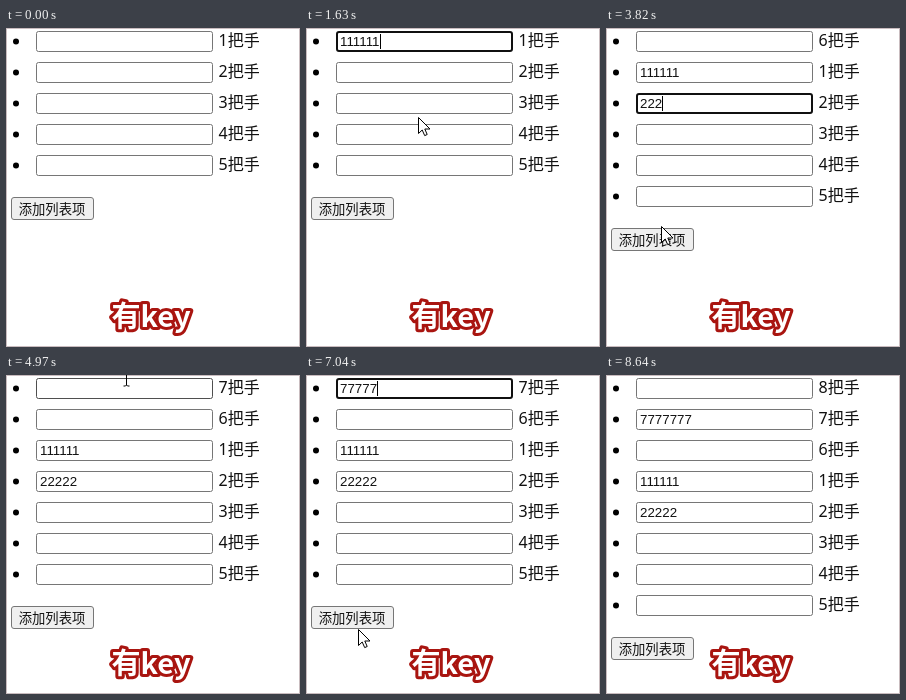
Write an HTML page that moves like this. It is 294x319 px and loops after 9080 ms.

```html
<!DOCTYPE html>
<html lang="zh-CN">
<head>
<meta charset="utf-8">
<title>有key</title>
<style>
  html, body { margin: 0; width: 100%; height: 100%; overflow: hidden; background: #fff; }
  svg { display: block; cursor: default; }
  text { user-select: none; fill: #111; }
  .label { font: 16px "Noto Sans", "Noto Sans CJK SC", sans-serif; }
  .value { font: 13.333px "Liberation Sans", Arial, sans-serif; }
  .action { font: 13.333px "Noto Sans CJK SC", sans-serif; text-anchor: middle; }
  .title {
    font: 900 29px "Noto Sans CJK SC", sans-serif; text-anchor: middle;
    fill: #fff; stroke: #a91510; stroke-width: 6; stroke-linejoin: round; paint-order: stroke;
  }
</style>
</head>
<body>
<svg width="294" height="319" viewBox="0 0 294 319">
  <rect x=".5" y=".5" width="293" height="318" fill="#fff" stroke="#c9bcbf"/>
  <g id="list"></g>
  <g id="button">
    <rect id="face" x="5.5" y=".5" width="82" height="22" rx="2.5"/>
    <text class="action" x="46" y="16.5">添加列表项</text>
  </g>
  <text class="title" x="145" y="299">有key</text>
  <path id="arrow" d="M.5 .5V16.5L4.2 13L6.7 18.6L9.2 17.5L6.8 12H12Z" fill="#fff" stroke="#000"/>
  <path id="beam" d="M-3 -7.5H-1L0 -6.5L1 -7.5H3M0 -6.5V6.5M-3 7.5H-1L0 6.5L1 7.5H3" fill="none" stroke="#000"/>
</svg>
<script>
const LOOP = 9080, PITCH = 31, FIRST = 5;

// Pointer moves; it rests in between
const enter = { x: 190, y: 300 };
const moves = [
  { from: 40, to: 520, x: 145, y: 15 },
  { from: 1250, to: 2130, x: 62, y: 199 },
  { from: 2560, to: 2920, x: 112, y: 75 },
  { from: 3310, to: 3930, x: 50, y: 209 },
  { from: 4330, to: 4970, x: 120, y: 3 },
  { from: 5040, to: 5100, x: 121, y: 13 },
  { from: 5520, to: 5970, x: 80, y: 229 },
  { from: 6380, to: 6740, x: 60, y: 286 },
  { from: 6740, to: 7040, x: 52, y: 254 },
  { from: 7060, to: 7500, x: 49, y: 243 },
  { from: 7860, to: 8600, x: 280, y: 315 }
];

// Each field repeats its own digit at a steady typing pace
const fields = {
  1: { focus: 560, blur: 1960, type: 670, pace: 150, length: 6 },
  2: { focus: 2950, blur: 4190, type: 3570, pace: 110, length: 5 },
  7: { focus: 5465, blur: 7730, type: 6560, pace: 115, length: 7 }
};
const adds = [2050, 4260, 7790];

const $ = id => document.getElementById(id);
const list = $("list"), button = $("button"), face = $("face"), arrow = $("arrow"), beam = $("beam");

function set(el, attrs) {
  for (const name in attrs) el.setAttribute(name, attrs[name]);
}
function add(parent, tag, attrs, text = "") {
  const el = document.createElementNS("http://www.w3.org/2000/svg", tag);
  set(el, attrs);
  el.textContent = text;
  return parent.appendChild(el);
}
const show = (el, on) => set(el, { display: on ? "inline" : "none" });
const moveTo = (el, x, y) => set(el, { transform: `translate(${x} ${y})` });
const clamp = (v, lo, hi) => Math.min(hi, Math.max(lo, v));
const inside = (p, x, y, w, h) => !!p && p.x >= x && p.x < x + w && p.y >= y && p.y < y + h;

const rows = Array.from({ length: FIRST + adds.length }, (_, i) => {
  const item = i + 1, g = add(list, "g", {});
  add(g, "circle", { cx: 10, cy: 13.4, r: 3 });
  const box = add(g, "rect", { fill: "#fff" });
  const value = add(g, "text", { class: "value", x: 34, y: 18 });
  const caret = add(g, "rect", { y: 6, width: 1, height: 15 });
  add(g, "text", { class: "label", x: 212.5, y: 18 }, item + "把手");
  return { item, g, box, value, caret, field: fields[item] };
});

function pointer(t) {
  if (t < moves[0].from || t > moves.at(-1).to) return null;
  let { x, y } = enter;
  for (const m of moves) {
    const u = clamp((t - m.from) / (m.to - m.from), 0, 1), e = u * u * (3 - 2 * u);
    x += (m.x - x) * e;
    y += (m.y - y) * e;
  }
  return { x: Math.round(x), y: Math.round(y) };
}

function drawField({ item, box, value, caret, field }, t, over) {
  const focused = !!field && t >= field.focus && t < field.blur;
  set(box, focused
    ? { x: 31, y: 4, width: 175, height: 19, rx: 2, stroke: "#101010", "stroke-width": 2 }
    : { x: 30.5, y: 3.5, width: 176, height: 20, rx: 2, stroke: over ? "#4f4f4f" : "#767676", "stroke-width": 1 });
  show(caret, false);
  if (!field) return;

  const typed = clamp(Math.floor((t - field.type) / field.pace) + 1, 0, field.length);
  const text = String(item).repeat(typed);
  if (value.textContent !== text) value.textContent = text;

  // The caret blinks, counted from the last input
  const last = typed ? field.type + (typed - 1) * field.pace : field.focus;
  if (focused && (t - last) % 1000 < 500) {
    set(caret, { x: Math.round(34 + (text ? value.getComputedTextLength() : 0)) });
    show(caret, true);
  }
}

function draw(t) {
  const p = pointer(t), count = FIRST + adds.filter(a => a <= t).length;
  let overField = false;

  for (const row of rows) {
    // New items go in front of the first ones
    const index = row.item > FIRST ? count - row.item : count - FIRST + row.item - 1;
    const y = index * PITCH, shown = row.item <= count;
    const over = shown && inside(p, 30, y + 3, 177, 21);
    show(row.g, shown);
    moveTo(row.g, 0, y);
    drawField(row, t, over);
    overField ||= over;
  }

  const top = count * PITCH + 14, over = inside(p, 5, top, 83, 23);
  const pressed = adds.some(a => t >= a - 70 && t < a);
  moveTo(button, 0, top);
  set(face, {
    fill: pressed ? "#f5f5f5" : over ? "#e5e5e5" : "#efefef",
    stroke: over ? "#4f4f4f" : "#767676"
  });

  show(arrow, p && !overField);
  show(beam, p && overField);
  if (p) {
    moveTo(arrow, p.x, p.y);
    moveTo(beam, p.x + 0.5, p.y + 0.5);
  }
}

const start = performance.now();
function tick() {
  draw((performance.now() - start) % LOOP);
  requestAnimationFrame(tick);
}
tick();
</script>
</body>
</html>
```
